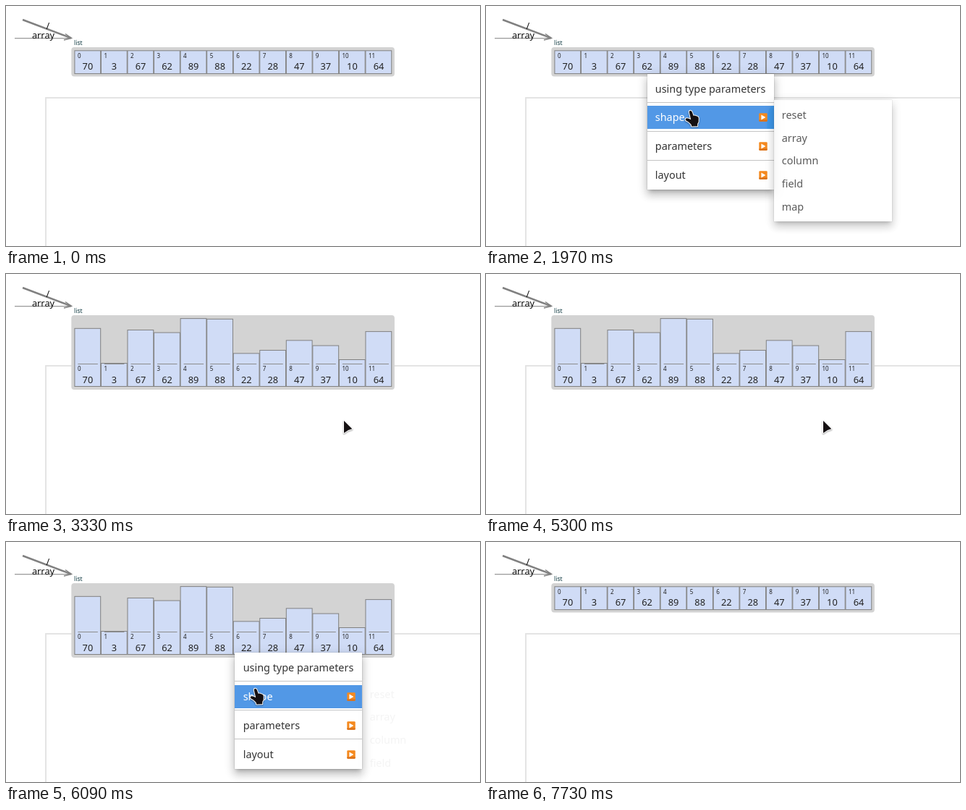
An HTML page with a canvas that plays this animation: 655 by 332 pixels, repeating every 8860 ms.

```html
<!DOCTYPE html>
<html lang="en">
<head>
<meta charset="utf-8">
<title>List shapes</title>
<style>
html, body { margin: 0; width: 100%; height: 100%; overflow: hidden; background: #fff; }
#stage { position: absolute; left: 0; top: 0; width: 655px; height: 332px; overflow: hidden; }
canvas { position: absolute; left: 0; top: 0; }
.menu {
  position: absolute; background: #fff; color: #333;
  font: 14.4px "Noto Sans", sans-serif;
  box-shadow: 0 0 1px rgba(0,0,0,.4), 0 5px 5px -3px rgba(0,0,0,.2),
    0 8px 10px 1px rgba(0,0,0,.14), 0 3px 14px 2px rgba(0,0,0,.12);
}
.row { position: absolute; left: 0; right: 0; height: 31.8px; line-height: 31.8px; white-space: nowrap; }
.row span { position: absolute; left: 11.3px; }
.row.on { background: #5298e6; color: #fff; }
.rule { position: absolute; left: 0; right: 0; height: 1px; background: #c4c4c4; }
.icon { position: absolute; right: 9px; top: 10px; width: 12px; height: 12px; }
.glow {
  position: absolute; right: 0; top: 0; width: 10px; height: 100%; opacity: 0;
  background: #3996ea; border-top-left-radius: 8px 28px;
}
</style>
</head>
<body>
<div id="stage"><canvas id="scene" width="655" height="332"></canvas></div>
<script>
const LOOP = 8860;
const ROW = 31.8, PITCH = 39.8;
const values = [70, 3, 67, 62, 89, 88, 22, 28, 47, 37, 10, 64];
const stage = document.getElementById('stage');
const ctx = document.getElementById('scene').getContext('2d');

const ARROW_ICON = `<svg class="icon" viewBox="0 0 12 12">
  <rect x=".3" y=".3" width="11.4" height="11.4" rx="1.2" fill="#f58a1f"/>
  <path d="M.3 9.5h11.4v1a1.2 1.2 0 0 1-1.2 1.2h-9A1.2 1.2 0 0 1 .3 10.5z" fill="#d9701a"/>
  <path d="M3.4 2.6L9.4 6L3.4 9.4z" fill="#fff"/></svg>`;

function add(parent, cls, html = '') {
  const el = document.createElement('div');
  el.className = cls;
  el.innerHTML = html;
  parent.append(el);
  return el;
}

function makeMenu(box, labels, pitch, nested) {
  const el = add(stage, 'menu');
  el.style.width = box.w + 'px';
  el.style.height = box.h + 'px';
  const rows = labels.map((label, i) => {
    const top = 5 + i * pitch;
    const glow = nested && i === 1 ? '<div class="glow"></div>' : '';
    const row = add(el, 'row', glow + `<span>${label}</span>` + (nested && i ? ARROW_ICON : ''));
    row.style.top = top + 'px';
    if (nested && i) add(el, 'rule').style.top = Math.floor(box.y + top - 4.7) - Math.round(box.y) + 'px';
    return row;
  });
  return { el, rows, box, pitch };
}

const main = makeMenu({ x: 222.5, y: 93.7, w: 175.3, h: 160.5 },
  ['using type parameters', 'shape', 'parameters', 'layout'], PITCH, true);
const sub = makeMenu({ x: 397.5, y: 129.9, w: 163, h: 168.3 },
  ['reset', 'array', 'column', 'field', 'map'], ROW, false);
const glow = main.el.querySelector('.glow');

const top2d = document.createElement('canvas');
top2d.width = 655;
top2d.height = 332;
stage.append(top2d);
const over = top2d.getContext('2d');

const ramp = (t, a, b) => Math.min(1, Math.max(0, (t - a) / (b - a)));
const smooth = k => k * k * (3 - 2 * k);

// Pointer stops: time, x, y
const path = [
  [960, 222, 91], [1700, 222, 91], [1750, 252, 128], [1800, 269, 139], [1960, 281, 141],
  [2020, 283, 142], [2200, 370, 158], [2330, 420, 164], [2450, 446, 182], [2570, 462, 194],
  [2610, 466, 200], [2650, 467, 203], [5300, 467, 203], [5400, 412, 188], [5500, 340, 160],
  [5570, 317, 152], [5880, 317, 152], [5960, 328, 178], [6070, 343, 199], [6110, 343, 199],
  [6250, 415, 205], [6400, 505, 212], [6520, 529, 215], [7590, 529, 215], [7700, 619, 224]
];

function pointer(t) {
  if (t < 960) return [213, 80];
  let i = 0;
  while (i < path.length - 2 && t >= path[i + 1][0]) i++;
  const [ta, xa, ya] = path[i], [tb, xb, yb] = path[i + 1];
  const k = ramp(t, ta, tb);
  return [Math.round(xa + (xb - xa) * k), Math.round(ya + (yb - ya) * k)];
}

function hitRow(menu, dx, dy, [x, y]) {
  const px = x - menu.box.x - dx, py = y - menu.box.y - dy - 5;
  if (px < 0 || px > menu.box.w || py < 0) return -1;
  const i = Math.floor(py / menu.pitch);
  return i < menu.rows.length && py - i * menu.pitch < ROW ? i : -1;
}

function place(menu, dx, dy, alpha, active) {
  const s = menu.el.style;
  s.left = menu.box.x + dx + 'px';
  s.top = menu.box.y + dy + 'px';
  s.opacity = alpha;
  s.visibility = alpha > 0 ? 'visible' : 'hidden';
  menu.rows.forEach((row, i) => row.classList.toggle('on', i === active));
}

function line(c, points, color, width) {
  c.beginPath();
  points.forEach(([x, y], i) => i ? c.lineTo(x, y) : c.moveTo(x, y));
  c.strokeStyle = color;
  c.lineWidth = width;
  c.stroke();
}

function text(s, x, y, size, color = '#222', align = 'left') {
  ctx.font = `${size}px "Noto Sans", sans-serif`;
  ctx.textAlign = align;
  ctx.fillStyle = color;
  ctx.fillText(s, x, y);
}

function drawList(columns) {
  ctx.fillStyle = '#d3d3d3';
  ctx.beginPath();
  ctx.roundRect(90.3, 57, 446.6, columns ? 103 : 40.5, 4);
  ctx.fill();
  values.forEach((v, i) => {
    const x = 94.9 + i * 36.55;
    const y = columns ? 125.7 - v * 0.72 : 61.8;
    const bottom = columns ? 155.5 : 93.6;
    ctx.fillStyle = '#d0dcf6';
    ctx.fillRect(x, y, 35.8, bottom - y);
    ctx.strokeStyle = '#808080';
    ctx.lineWidth = 1;
    ctx.strokeRect(x, y, 35.8, bottom - y);
    if (columns) line(ctx, [[x + 4.5, 124.5], [x + 32, 124.5]], '#8c8c8c', 1);
    text(i, x + 4, columns ? 134 : 72, 8);
    text(v, x + 18, columns ? 151 : 88, 12.8, '#222', 'center');
  });
}

function drawScene(columns) {
  ctx.clearRect(0, 0, 655, 332);
  line(ctx, [[660, 127], [55, 127], [55, 340]], '#e4e4e4', 2);
  line(ctx, [[12, 44.7], [90, 44.7]], '#999', 1.2);
  line(ctx, [[23, 19], [90, 44.3]], '#808080', 2.5);
  line(ctx, [[82, 38.5], [90.5, 44.5], [80, 47]], '#808080', 1.4);
  text('/', 58, 32, 12.8, '#111', 'center');
  text('array', 51.5, 45, 12.8, '#111', 'center');
  text('list', 94, 54, 8.5, '#123c44');
  drawList(columns);
}

const arrow = new Path2D('M0 0L11.3 11.2L6 13L0 17Z');
const hand = new Path2D('M-.3 5.4Q.2 3.3 2.2 3.9Q3.4 4.3 3.9 6L5.6 10.8Q8 9.9 9.3 11.3Q12.6 11.6 12.8 14.6' +
  'L12.6 19.5L11.2 22L11.2 25.3L3.2 25.6L2.6 23L-1 19.4L-4.8 17.3Q-6.2 15.4-4.4 14.4Q-1.6 14 2.2 16.2Z');

function drawPointer([x, y], isHand) {
  const shape = isHand ? hand : arrow;
  over.save();
  over.translate(x, y);
  over.lineJoin = 'round';
  over.save();
  over.shadowColor = 'rgba(0,0,0,.4)';
  over.shadowBlur = 2;
  over.shadowOffsetY = 1;
  over.strokeStyle = '#fff';
  over.lineWidth = 2;
  over.stroke(shape);
  over.restore();
  over.fillStyle = '#151012';
  over.fill(shape);
  over.restore();
}

function render(t) {
  const second = t > 4000;
  const dx = second ? 93.9 : 0, dy = second ? 59.6 : 0;
  const fadeOut = 1 - (second ? ramp(t, 6970, 7255) : ramp(t, 3010, 3325));
  const mainAlpha = smooth(second ? ramp(t, 5590, 5870) : ramp(t, 1220, 1535)) * fadeOut;
  const subIn = second ? ramp(t, 6078, 6350) : ramp(t, 1750, 2025);
  const subAlpha = subIn * fadeOut;

  const p = pointer(t);
  const inSub = subAlpha > 0 ? hitRow(sub, dx, dy, p) : -1;
  const inMain = mainAlpha > 0 ? hitRow(main, dx, dy, p) : -1;
  place(main, dx, dy, mainAlpha, subAlpha > 0 ? 1 : inMain);
  place(sub, dx, dy, subAlpha, inSub);
  glow.style.opacity = subIn;

  drawScene(t >= 3030 && t < 6990);
  over.clearRect(0, 0, 655, 332);
  if (t >= 920 && t < 7730) drawPointer(p, inMain >= 0 || inSub >= 0);
}

function tick() {
  render(performance.now() % LOOP);
  requestAnimationFrame(tick);
}
tick();
</script>
</body>
</html>
```
